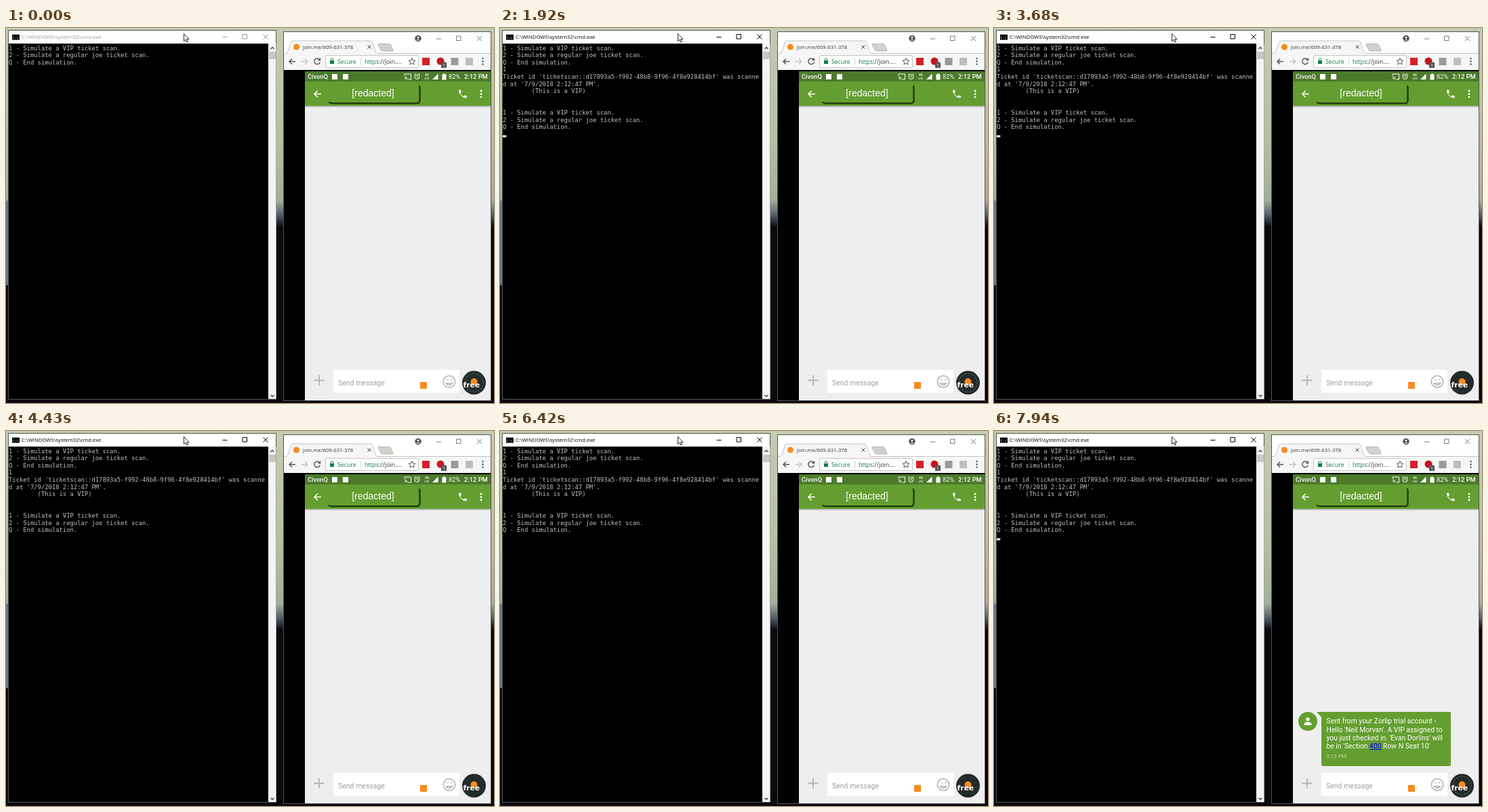
Write an HTML page that moves like this. It is 720 px wide and 554 px high and loops after 8 s.

```html
<!DOCTYPE html>
<html lang="en">
<head>
<meta charset="utf-8">
<title>Ticket scan simulation</title>
<style>
  html, body { margin: 0; width: 100%; height: 100%; overflow: hidden; background: #08060a; }
  svg { display: block; width: 720px; height: 554px; }
  text { white-space: pre; }
  .ui { font-family: "Open Sans", sans-serif; font-size: 7.7px; }
  .bar { font-size: 8.8px; }
  .phone { font-family: Roboto, sans-serif; font-size: 10.35px; }
  .status { font-size: 9.3px; font-weight: 500; fill: #fff; }
  .mono { font-family: "DejaVu Sans Mono", monospace; font-size: 8.86px; fill: #c0c0c0; }
  .line { fill: none; stroke-width: 1; }
</style>
</head>
<body>
<svg viewBox="0 0 720 554">
  <defs>
    <linearGradient id="wall" x2="0" y2="1">
      <stop offset="0" stop-color="#c3ccb0"/>
      <stop offset=".3" stop-color="#b5c0a0"/>
      <stop offset=".46" stop-color="#a3ae98"/>
      <stop offset=".5" stop-color="#4d5a66"/>
      <stop offset=".53" stop-color="#0b080e"/>
    </linearGradient>
    <linearGradient id="shade" x2="0" y2="1">
      <stop offset="0" stop-color="#a8aaa5"/>
      <stop offset="1" stop-color="#eee"/>
    </linearGradient>
    <g id="controls" class="line">
      <path d="M0 4.5H7M29.5 .5h6.5v6.5h-6.500zM60 .5l7 7m0-7l-7 7"/>
    </g>
  </defs>

  <!-- wallpaper -->
  <rect width="720" height="554" fill="url(#wall)"/>
  <path d="M0 255H4V380H0z" fill="#64748a"/>
  <path d="M0 380H4V554H0z" fill="#0b080e"/>

  <!-- console window -->
  <rect x="3.500" y="3.500" width="395" height="545" fill="#fff" stroke="#555"/>
  <rect x="4" y="23" width="383" height="525"/>
  <rect x="9" y="9" width="11" height="8.500"/>
  <path d="M9 9.500h11" stroke="#aaa"/>
  <text x="10" y="15.500" class="mono" style="font-size:4.500px;fill:#fff">C:\</text>
  <g id="title">
    <text x="23" y="16" class="ui">C:\WINDOWS\system32\cmd.exe</text>
    <use href="#controls" x="319.500" y="9" stroke="currentColor"/>
  </g>
  <rect x="387" y="23" width="11.500" height="525" fill="#f4f4f4"/>
  <rect x="388" y="35" width="10" height="11" fill="#cdc5c2"/>
  <path d="M390.500 31l2.500-2.500 2.500 2.500M390.500 542l2.500 2.500 2.500-2.500" class="line" stroke="#444" style="stroke-width:1.300"/>
  <g id="console" class="mono"></g>
  <rect id="caret" x="4" width="5.300" height="3" fill="#f2f2f2"/>
  <path d="M262.500 8.500v11l2.500-2.300 1.800 3.800 1.700-.8-1.700-3.700h3.200z" fill="#fff" stroke="#111" stroke-width=".9"/>

  <!-- browser window -->
  <rect x="409.500" y="5.500" width="306" height="545" fill="#fff" stroke="#555"/>
  <rect x="410" y="37" width="305" height="25" fill="#f6f6f6"/>
  <path d="M410 37.500h3q2 0 3-3l4-12q1-3.500 3-3.500h115q2 0 3 3.500l4 12q1 3 3 3h167" fill="#f6f6f6" stroke="#b4b4b4" stroke-width=".8"/>
  <path d="M549.500 23.500h16q1.500 0 2 1.500l3.500 7.500q.5 1.500-1 1.500h-15q-1.500 0-2-1.500l-4-7.500q-.5-1.500.5-1.500z" fill="#cdd4cb" stroke="#a5aaa4" stroke-width=".8"/>
  <circle cx="428.500" cy="28" r="4.500" fill="#f68b1f"/>
  <text x="438" y="31" class="ui" fill="#333">join.me/609-631-378</text>
  <path d="M533.500 25.500l5 5m0-5l-5 5" class="line" stroke="#444"/>
  <circle cx="608" cy="15.500" r="4.700" fill="#505050"/>
  <circle cx="608" cy="14" r="1.500" fill="#fff"/>
  <path d="M605 18.200q3-3 6 0" fill="#fff"/>
  <use href="#controls" x="635" y="11.500" stroke="#777" id="far"/>
  <g class="line" stroke="#505050" style="stroke-width:1.400">
    <path d="M427 49.500h-9m4-4l-4 4 4 4"/>
    <path d="M436 49.500h9m-4-4l4 4-4 4" stroke="#c4c4c4"/>
    <path d="M462.500 46.500a4.300 4.300 0 1 0 .8 4M463.500 44.500v3h-3"/>
  </g>
  <rect x="471.500" y="40.500" width="137" height="18" rx="1.500" fill="#fff" stroke="#c4c4c4"/>
  <rect x="478" y="48" width="6" height="5" fill="#0b8043"/>
  <path d="M479.300 48v-1.500a1.700 1.700 0 0 1 3.400 0v1.500" class="line" stroke="#0b8043"/>
  <text x="489" y="52.600" class="ui bar" fill="#0b8043">Secure</text>
  <path d="M523.500 44v11" stroke="#d4d4d4"/>
  <text x="529" y="52.600" class="ui bar" fill="#333"><tspan fill="#0b8043">https</tspan>://join....</text>
  <path d="M599 44.500l1.400 3.300 3.600.3-2.700 2.400.8 3.500-3.100-1.900-3.100 1.900.8-3.500-2.700-2.400 3.600-.3z" class="line" stroke="#505050"/>
  <rect x="614" y="44" width="11" height="11" fill="#d32029"/>
  <circle cx="641" cy="49" r="5.500" fill="#c4161c"/>
  <rect x="642" y="50.500" width="8" height="8.500" rx="1" fill="#555"/>
  <text x="644" y="57.500" class="ui" fill="#fff" style="font-size:7px">1</text>
  <rect x="656.500" y="44" width="11" height="11" fill="#9a9a9a"/>
  <rect x="678" y="44" width="11" height="11" fill="#bdbdbd"/>
  <g fill="#505050"><circle cx="703.500" cy="45" r="1.200"/><circle cx="703.500" cy="49.200" r="1.200"/><circle cx="703.500" cy="53.400" r="1.200"/></g>

  <!-- phone screen -->
  <rect x="410" y="62" width="305" height="488"/>
  <rect x="441" y="115" width="274" height="435" fill="#eee"/>
  <rect x="441" y="64" width="274" height="15.500" fill="#4c7a2b"/>
  <rect x="441" y="79" width="274" height="36" fill="#649e30"/>
  <rect x="441" y="115" width="274" height="3" fill="url(#shade)"/>
  <g class="phone status">
    <text x="445" y="75.300">CivonQ</text>
    <text x="653" y="75.300" style="font-weight:400">82%</text>
    <text x="676" y="75.300">2:12 PM</text>
    <text x="618" y="71" style="font-size:4.800px">4G</text>
    <text x="617.500" y="76" style="font-size:4.300px">LTE</text>
    <rect x="481" y="68" width="8" height="8"/>
    <rect x="497" y="68" width="8" height="8"/>
    <path d="M629 76h8.500v-8.500zM643.500 68.500h1.500v-1h3v1h1.500v8h-6z"/>
  </g>
  <g class="line" stroke="#fff">
    <path d="M588 70.500v-2.500h9.500v8h-4M588 72q4 0 4 4M588 74q2 0 2 2" />
    <circle cx="606.500" cy="72" r="3.500"/>
    <path d="M606.500 70v2.200l1.500 1M602.300 69l2-1.800M610.700 69l-2-1.800"/>
  </g>
  <path d="M476 109.500q2 1.800 6 1.800h124q4.500 0 4.500-5v-18q0-2-1.500-3" fill="none" stroke="#25400f" stroke-width="2.600"/>
  <rect x="475" y="84.500" width="134" height="25" rx="4" fill="#649e30"/>
  <text x="541.500" y="101" text-anchor="middle" fill="#fff" style="font:14px 'Liberation Sans',sans-serif">[redacted]</text>
  <path d="M465 97.500h-10m4.700-4.700l-4.700 4.700 4.700 4.700" class="line" stroke="#fff" style="stroke-width:1.500"/>
  <path d="M668 91.500h3l.8 3.500-1.700 1.700q1.500 3 4.400 4.400l1.700-1.700 3.500.8v3q-4.500.5-8.200-3.300t-3.500-8.400z" fill="#fff"/>
  <g fill="#fff"><circle cx="701" cy="93" r="1.400"/><circle cx="701" cy="97.500" r="1.400"/><circle cx="701" cy="102" r="1.400"/></g>

  <!-- incoming message -->
  <g id="settling">
    <path d="M442 356H701V486H474V452H442z" fill="#f5f5f5"/>
    <path d="M447 350H697V400Q693 407 670 407H474Q453 407 447 398z" fill="#eee"/>
  </g>
  <g id="message" class="phone" fill="#fff">
    <circle cx="463" cy="429" r="14" fill="#649e30"/>
    <circle cx="463" cy="426" r="2.700"/>
    <path d="M457.500 434.500v-1.500q0-3 5.500-3t5.500 3v1.500z"/>
    <path d="M476 415H672q2 0 2 2V493q0 2-2 2H485q-2 0-2-2V423z" fill="#649e30"/>
    <text x="490.500" y="432">Sent from your Zorlip trial account -</text>
    <text x="490.500" y="444.500">Hello 'Neil Morvan'. A VIP assigned to</text>
    <text x="490.500" y="456.700">you just checked in. 'Evan Dorlins' will</text>
    <text x="490.500" y="469">be in 'Section <tspan fill="#00e" text-decoration="underline">400</tspan> Row N Seat 10'</text>
    <text x="490.500" y="483" fill="#c6dcae" style="font-size:8px">2:12 PM</text>
  </g>

  <!-- composer -->
  <path d="M454.500 520.500h15M462 513v15" class="line" stroke="#b3b3b3" style="stroke-width:1.800"/>
  <rect x="483" y="505" width="186" height="34" rx="1" fill="#fff"/>
  <text x="490" y="527.500" class="phone" fill="#a0a0a0" style="font-size:10.500px">Send message</text>
  <g class="line" stroke="#b0b0b0" style="stroke-width:1.500">
    <circle cx="654" cy="522.500" r="8.700"/>
    <path d="M649.500 525q4.500 5.500 9 0zM650.500 519.500h2M656 519.500h2"/>
  </g>
  <rect x="611" y="523" width="10" height="10" fill="#f68b1f"/>
  <circle cx="690.500" cy="524" r="17.500" fill="#232a2a"/>
  <circle id="ring" cx="690.500" cy="524" r="13.500" class="line" stroke="#8a908c" stroke-dasharray="2 2.240" style="stroke-width:1.500"/>
  <circle cx="690.500" cy="522.500" r="5" fill="#f68b1f"/>
  <text x="674.500" y="531" fill="#fff" style="font:bold 10.800px 'DejaVu Sans',sans-serif">free</text>
</svg>
<script>
const LOOP = 8000, BLINK = 1060;
const FOCUS = 520, TYPED = 700, SCANNED = 860, RECEIVED = 6540, SETTLED = 7030;
const byId = id => document.getElementById(id);
const show = (id, on) => byId(id).setAttribute('visibility', on ? 'visible' : 'hidden');
const baseline = row => 32.6 + row * 10.62;

const menu = [
  '1 - Simulate a VIP ticket scan.',
  '2 - Simulate a regular joe ticket scan.',
  'Q - End simulation.'
];
const lines = [
  ...menu,
  '1',
  "Ticket id 'ticketscan::d17893a5-f992-48b8-9f96-4f8e928414bf' was scanne",
  "d at '7/9/2018 2:12:47 PM'.",
  '        (This is a VIP)',
  '', '',
  ...menu
];
const rows = lines.map((line, i) => {
  const row = document.createElementNS('http://www.w3.org/2000/svg', 'text');
  row.setAttribute('x', 4);
  row.setAttribute('y', baseline(i));
  row.textContent = line;
  byId('console').append(row);
  return row;
});

function draw(t) {
  const active = t >= FOCUS;
  const count = t >= SCANNED ? lines.length : t >= TYPED ? 4 : 3;
  rows.forEach((row, i) => row.setAttribute('visibility', i < count ? 'visible' : 'hidden'));

  byId('title').style.color = byId('title').style.fill = active ? '#000' : '#999';
  byId('caret').setAttribute('y', baseline(count) - 1.6);
  show('caret', active && (t + BLINK - 400) % BLINK < BLINK / 2);

  show('message', t >= RECEIVED);
  show('settling', t >= RECEIVED && t < SETTLED);

  const ring = byId('ring');
  ring.setAttribute('opacity', t < 2600 || t > 7360 ? .5 : .1);
  ring.setAttribute('transform', `rotate(${t * 360 / LOOP} 690.5 524)`);
}

function tick(now) {
  draw(now % LOOP);
  requestAnimationFrame(tick);
}
draw(0);
requestAnimationFrame(tick);
</script>
</body>
</html>
```
